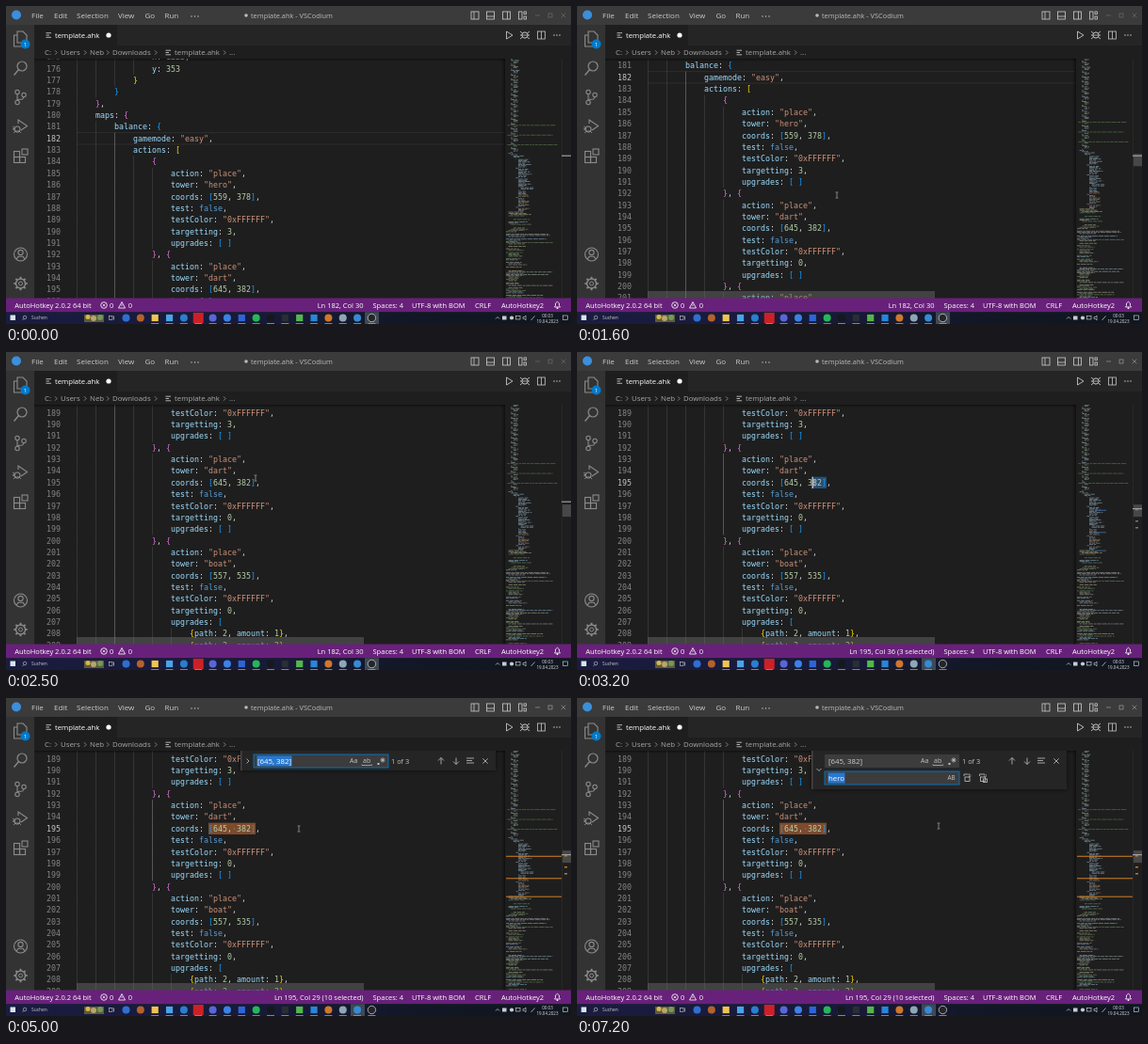
Recreate the animation shown at these times as an HTML page with a canvas. Size 600 px wide and 338 px high, loop 8 s.

```html
<!DOCTYPE html>
<html lang="en">
<head>
<meta charset="utf-8">
<title>Code editor</title>
<style>
  html, body { margin: 0; width: 100%; height: 100%; overflow: hidden; background: #1e1e1e; }
  canvas { display: block; width: 600px; height: 338px; }
</style>
</head>
<body>
<canvas id="stage"></canvas>
<script>
const LOOP = 8000, STEP = 100;
const UI = '"Open Sans", "Noto Sans", sans-serif';
const MONO = '"DejaVu Sans Mono", "Noto Sans Mono", monospace';
const CODE_SIZE = 8.3, LEFT = 75, CHAR = 5, LINE = 12.35, FIRST = 175;
const NOTCH = 32.5, NOTCHES = [1200, 1400, 1900, 2100, 2300];
const CLICK = 3000, DRAG_END = 3600, FIND = 4700, REPLACE = 5900;
const BRACKETS = ['#ffd700', '#da70d6', '#179fff'];
const POINTER = [[0, 388, 331], [700, 317, 236], [1600, 276, 201], [2500, 265, 134], [2900, 266, 139],
  [CLICK, 265, 139], [DRAG_END, 215, 139], [4000, 215, 139], [4600, 311, 139], [5300, 311, 139], [7200, 384, 136]];

const unit = (tower, coords, target) => [
  [5, 'action: "place",'], [5, `tower: "${tower}",`], [5, `coords: [${coords}],`], [5, 'test: false,'],
  [5, 'testColor: "0xFFFFFF",'], [5, `targetting: ${target},`]];
const DOC = [
  [4, 'x: 1222,'], [4, 'y: 353'], [3, '}'], [2, '}'], [1, '},'],
  [1, 'maps: {'], [2, 'balance: {'], [3, 'gamemode: "easy",'], [3, 'actions: ['], [4, '{'],
  ...unit('hero', '559, 378', 3), [5, 'upgrades: [ ]'], [4, '}, {'],
  ...unit('dart', '645, 382', 0), [5, 'upgrades: [ ]'], [4, '}, {'],
  ...unit('boat', '557, 535', 0), [5, 'upgrades: ['],
  [6, '{path: 2, amount: 1},'], [6, '{path: 2, amount: 2},'], [5, ']']];

const canvas = document.getElementById('stage');
const g = canvas.getContext('2d');
const ratio = window.devicePixelRatio || 1;
canvas.width = 600 * ratio;
canvas.height = 338 * ratio;

function tokenize() {
  let depth = 4;
  return DOC.map(([indent, source]) => {
    const tokens = [];
    for (const m of source.matchAll(/"[^"]*"|\d+|\w+|[^\s]/g)) {
      const s = m[0];
      let color = '#d4d4d4';
      if (s[0] === '"') color = '#ce9178';
      else if (/^\d/.test(s)) color = '#b5cea8';
      else if (s === 'false') color = '#569cd6';
      else if (/^\w/.test(s)) color = '#9cdcfe';
      else if (/[[{]/.test(s)) color = BRACKETS[depth++ % 3];
      else if (/[\]}]/.test(s)) color = BRACKETS[--depth % 3];
      tokens.push({ s, color, col: indent * 4 + m.index });
    }
    return { indent, tokens, length: source.length };
  });
}
const lines = tokenize();

function rect(x, y, w, h, color) { g.fillStyle = color; g.fillRect(x, y, w, h); }
function frame(x, y, w, h, color, width = 0.8) { g.strokeStyle = color; g.lineWidth = width; g.strokeRect(x, y, w, h); }
function disc(x, y, r, color) { g.fillStyle = color; g.beginPath(); g.arc(x, y, r, 0, 7); g.fill(); }
function ring(x, y, r, color, width = 0.8) {
  g.strokeStyle = color; g.lineWidth = width; g.beginPath(); g.arc(x, y, r, 0, 7); g.stroke();
}
function path(points, color, width = 0.8, closed = false) {
  g.strokeStyle = color; g.lineWidth = width; g.beginPath();
  for (let i = 0; i < points.length; i += 2) g.lineTo(points[i], points[i + 1]);
  if (closed) g.closePath();
  g.stroke();
}
function cross(x, y, r, color, width = 0.8) {
  path([x - r, y - r, x + r, y + r], color, width);
  path([x - r, y + r, x + r, y - r], color, width);
}
function text(s, x, y, size, color = '#cccccc', family = UI) {
  g.font = `${size}px ${family}`;
  g.fillStyle = color;
  g.fillText(s, x, y + size * 0.357);
}
function fade(x0, y0, x1, y1, ...colors) {
  const gradient = g.createLinearGradient(x0, y0, x1, y1);
  colors.forEach((c, i) => gradient.addColorStop(i / (colors.length - 1), c));
  return gradient;
}
function noise(n) { const v = Math.sin(n * 127.1 + 11.7) * 43758.5453; return v - Math.floor(v); }

function drawTitleBar(focused) {
  rect(0, 0, 600, 20, '#3b3b3c');
  disc(11, 9.5, 5, '#3b8fdc');
  [['File', 27], ['Edit', 51], ['Selection', 75], ['View', 119], ['Go', 147.5], ['Run', 168.5]]
    .forEach(([s, x]) => text(s, x, 10, 8));
  [197, 200.5, 204].forEach(x => disc(x, 11, 0.7, '#cccccc'));
  disc(255, 10, 1.8, '#bbbbbb');
  text('template.ahk - VSCodium', 260, 10, 7.4, '#bbbbbb');
  [498, 514.5, 531.5].forEach((x, i) => {
    frame(x - 4, 6, 8, 8, '#cccccc');
    if (i === 0) path([x - 1, 6, x - 1, 14], '#cccccc');
    if (i === 1) path([x - 4, 11, x + 4, 11], '#cccccc');
    if (i === 2) path([x + 1, 6, x + 1, 14], '#cccccc');
  });
  frame(544.5, 6, 3.5, 8, '#cccccc');
  frame(550, 6, 2.5, 2.5, '#cccccc');
  frame(550, 11, 2.5, 3, '#cccccc');
  const c = focused ? '#aaaaaa' : '#747474';
  path([562, 10, 567, 10], c, 0.6);
  frame(576, 8, 4, 4, c, 0.6);
  cross(592, 10, 2.3, c, 0.6);
}
function fileMark(x, y) {
  [-2.3, 0, 2.3].forEach((d, i) => path([x - 2.5, y + d, x + (i === 1 ? 1 : 3), y + d], '#c5c5c5', 0.9));
}

function drawActivityBar() {
  const c = '#8b8b8b';
  rect(0, 20, 30, 291, '#333333');
  path([12, 27, 18, 27, 22, 31, 22, 39, 12, 39], c, 1.1, true);
  path([12, 31, 8.5, 31, 8.5, 43, 18, 43, 18, 39], c, 1.1);
  disc(20.5, 40.5, 5, '#007acc');
  text('1', 18.8, 40.5, 6, '#ffffff');
  ring(17, 64, 5, c, 1.2);
  path([13.5, 67.5, 8.5, 73.5], c, 1.3);
  ring(12, 91.5, 2.2, c, 1.1); ring(12, 102.5, 2.2, c, 1.1); ring(19, 94.5, 2.2, c, 1.1);
  path([12, 94, 12, 100], c, 1.1);
  path([19, 97, 17.5, 99, 12, 99.5], c, 1.1);
  path([13, 125, 13, 121, 22.5, 127.5, 16, 132], c, 1.1);
  ring(12, 131, 3, c, 1.1);
  path([7, 128, 10, 130, 7, 131, 9, 131], c, 0.9);
  path([8, 135, 10, 133, 14, 133, 16, 135], c, 0.9);
  frame(8.5, 154.5, 6, 6, c, 1.1); frame(8.5, 160.5, 6, 6, c, 1.1);
  frame(14.5, 160.5, 6, 6, c, 1.1); frame(17, 152, 6, 6, c, 1.1);
  ring(15.5, 264, 7, c, 1.1); ring(15.5, 262, 2.6, c, 1.1);
  path([11, 269, 13, 266.3, 18, 266.3, 20, 269], c, 1.1);
  ring(15.5, 295, 5, c, 1.4); ring(15.5, 295, 2, c, 1);
  for (let i = 0; i < 8; i++) {
    const a = i * Math.PI / 4, dx = Math.cos(a), dy = Math.sin(a);
    path([15.5 + dx * 5, 295 + dy * 5, 15.5 + dx * 7.2, 295 + dy * 7.2], c, 1.8);
  }
}

function drawTabs() {
  rect(30, 20, 570, 22, '#252526');
  rect(30, 20, 88, 22, '#1e1e1e');
  fileMark(45, 31);
  text('template.ahk', 52, 31, 7.7, '#ffffff');
  disc(109, 31, 2.6, '#ffffff');
  const c = '#c5c5c5';
  path([531.5, 27, 538, 31, 531.5, 35], c, 0.9, true);
  ring(551, 31, 3.1, c, 1);
  path([549, 31, 553, 31], c, 0.8);
  [-1, 1].forEach(s => [-4, 0, 4].forEach(d => path([551 + s * 2.6, 31 + d * 0.5, 551 + s * 5, 31 + d], c, 0.9)));
  frame(564.5, 27, 8, 8, c); path([568.5, 27, 568.5, 35], c);
  [582, 585, 588].forEach(x => disc(x, 31, 0.75, c));
}
function drawBreadcrumb() {
  rect(30, 42, 570, 14, '#1e1e1e');
  const c = '#a9a9a9';
  [['C:', 41], ['Users', 58], ['Neb', 89], ['Downloads', 113], ['template.ahk', 179], ['...', 237]]
    .forEach(([s, x]) => text(s, x, 49.5, 7.8, c));
  [53, 84, 108, 159, 232].forEach(x => path([x - 1, 47.3, x + 1.2, 49.5, x - 1, 51.7], c, 0.7));
  fileMark(172, 49.5);
}

function drawCode(t, scroll) {
  const clicked = t >= CLICK, current = clicked ? 195 : 182;
  const dragged = Math.round(10 * Math.min(1, Math.max(0, (t - CLICK) / (DRAG_END - CLICK))));
  const center = n => 140.8 + (n - 182) * LINE - scroll;
  const caretX = 265 - dragged * CHAR;
  g.save();
  g.beginPath(); g.rect(30, 56, 500, 255); g.clip();
  if (!dragged) {
    const top = center(current) - LINE / 2;
    path([LEFT, top, 529, top], '#303030', 0.9);
    path([LEFT, top + LINE, 529, top + LINE], '#303030', 0.9);
  }
  lines.forEach(({ indent, tokens }, i) => {
    const n = FIRST + i, y = center(n);
    if (y < 48 || y > 318) return;
    for (let k = 0; k < indent; k++) {
      const active = clicked ? k === 4 && n > 192 && n < 200 : k === 2 && n > 181;
      rect(LEFT + k * 20, y - LINE / 2, 0.7, LINE, active ? '#707070' : '#404040');
    }
    if (n === 195 && dragged) {
      rect(caretX, y - LINE / 2, dragged * CHAR, LINE, t >= FIND ? '#7d4b2c' : '#264f78');
      if (dragged > 4) disc(242.5, y, 0.6, '#8a9299');
    }
    text(n, 43, y, CODE_SIZE, n === current ? '#c6c6c6' : '#858585', MONO);
    tokens.forEach(k => text(k.s, LEFT + k.col * CHAR, y, CODE_SIZE, k.color, MONO));
    const blink = t < 4000 || Math.floor((t - 4000) / 500) % 2 === 1;
    if (n === 195 && clicked && t < FIND && blink) rect(caretX - 0.5, y - LINE / 2, 1.3, LINE, '#d4d4d4');
  });
  if (t >= 300) rect(LEFT, 303, 305, 8, 'rgba(121,121,121,0.4)');
  rect(30, 56, 500, 3, fade(0, 56, 0, 59, 'rgba(0,0,0,0.45)', 'rgba(0,0,0,0)'));
  rect(526, 56, 4, 255, fade(526, 0, 530, 0, 'rgba(0,0,0,0)', 'rgba(0,0,0,0.5)'));
  g.restore();
  return dragged;
}

// Minimap rows: coordinate groups, then the map actions, then plain functions.
function minimapRow(n) {
  const r = noise(n);
  if (n < 180) {
    if (n % 8 === 5 && n > 150) return [2, 50 + r * 35, '#5a7d48'];
    const phase = n % 4;
    return [[8, 12, 12, 8][phase], [6 + r * 8, 8, 7, 2][phase], phase === 0 ? '#8ba9b9' : '#8f9d88'];
  }
  if (n < 228) {
    const row = lines[n - FIRST];
    if (row) return [row.indent * 4, row.length, '#8aa3b3'];
    return n % 8 === 0 ? [16, 4, '#a070a0'] : [20, 8 + r * 12, r > 0.6 ? '#a5896f' : '#7f9db3'];
  }
  if (r < (n < 236 ? 0.6 : 0.2)) return null;
  const wide = noise(n + 500) > 0.82 && n > 244;
  const indent = 4 * Math.floor(noise(n + 90) * (n < 244 ? 4 : 2));
  const colors = ['#6c8560', '#7aa0bd', '#a5a585', '#969696'];
  return [indent, wide ? 55 + r * 22 : 8 + r * 26, colors[Math.floor(noise(n + 300) * 4)]];
}
function drawMinimap(t, scroll, selected) {
  const shift = scroll * 0.05, rowY = n => 155 + (n - 179) * 1.3 - shift;
  const mark = t >= FIND ? 'rgba(205,125,35,0.8)' : 'rgba(55,105,155,0.75)';
  rect(530, 56, 70, 255, '#1e1e1e');
  g.save();
  g.beginPath(); g.rect(530, 56, 60, 255); g.clip();
  g.globalAlpha = 0.75;
  for (let n = 103; n < 306; n++) {
    const row = minimapRow(n);
    if (!row) continue;
    const x = 531 + row[0] * 0.65, w = row[1] * 0.65;
    for (let dx = 0, k = 0; dx < w; k++) {
      const piece = Math.min(w - dx, 2 + noise(n * 9 + k) * 4);
      rect(x + dx, rowY(n), piece, 0.8, row[2]);
      dx += piece + 0.8;
    }
  }
  g.globalAlpha = 1;
  if (selected) [195, 213, 228].forEach(n => rect(t >= FIND ? 531 : 550, rowY(n), t >= FIND ? 59 : 12, 1.3, mark));
  g.restore();
  rect(590, 56, 0.6, 255, '#303030');
  if (t >= 300) rect(591, 154 + shift, 9, 13, 'rgba(121,121,121,0.45)');
  rect(590, t >= CLICK ? 166 : 158.6, 10, 1.2, '#a0a0a0');
  if (selected) [167, 179, 186].forEach(y => rect(593, y, 3, 1.5, t >= FIND ? '#b87830' : '#777777'));
}

function drawInput(y, value, focused) {
  rect(263, y, 143, 14, '#3c3c3c');
  if (focused) {
    frame(263, y, 143, 14, '#007fd4');
    g.font = `7.85px ${UI}`;
    rect(266.5, y + 1.5, g.measureText(value).width + 1, 11, '#2878d0');
  }
  text(value, 267, y + 7, 7.85, focused ? '#ffffff' : '#cccccc');
}
function drawFind(t) {
  if (t < FIND) return;
  const replace = t >= REPLACE, h = replace ? 41 : 21, c = '#c5c5c5';
  const slide = Math.min(1, (t - FIND + STEP) / 200);
  g.save();
  g.beginPath(); g.rect(240, 56, 290, 60); g.clip();
  g.translate(0, (slide - 1) * 21);
  g.shadowColor = 'rgba(0,0,0,0.6)'; g.shadowBlur = 5;
  rect(249, 56, 271, h, '#252526');
  g.shadowBlur = 0; g.shadowColor = 'transparent';
  rect(249, 56, 1.5, h, '#454545');
  path(replace ? [254.5, 75, 257, 77.5, 259.5, 75] : [255.5, 64.5, 258, 67, 255.5, 69.5], c);
  drawInput(60, '[645, 382]', !replace);
  text('Aa', 365, 67, 7, c);
  text('ab', 379, 66.5, 7, c);
  path([378, 70.5, 378, 71.5, 388.5, 71.5, 388.5, 70.5], c, 0.7);
  rect(394.5, 69, 2, 2, c);
  cross(400, 66, 1.8, c); path([400, 63.3, 400, 68.7], c); path([397.4, 66, 402.6, 66], c);
  text('1 of 3', 409, 67.5, 7.4, c);
  [[462, -1], [478, 1]].forEach(([x, d]) => {
    path([x, 67 - 3.5 * d, x, 67 + 3.5 * d], c);
    path([x - 3, 67 + 0.5 * d, x, 67 + 3.5 * d, x + 3, 67 + 0.5 * d], c);
  });
  [[64, 4], [66.5, 3], [69, 4]].forEach(([y, w]) => path([489, y, 489 + w * 2, y], c));
  cross(509, 67, 2.7, c);
  if (replace) {
    drawInput(78, 'hero', true);
    text('AB', 393.5, 84.5, 6.4, c);
    [414.5, 431].forEach((x, i) => {
      frame(x - 2.5, 84, 5, 4.5, c);
      path([x - 3.5, 83, x - 3.5, 81, x + 1, 81], c);
      text('b', x + 1, 82, 5, c);
      if (i) frame(x + 0.5, 86, 4, 3.5, c);
    });
  }
  g.restore();
}

function drawStatus(selected, clicked) {
  rect(0, 310.5, 600, 15, '#68217a');
  const label = (s, x) => text(s, x, 318, 7.5, '#ffffff');
  label('AutoHotkey 2.0.2 64 bit', 9.3);
  ring(104, 318, 3.3, '#ffffff'); cross(104, 318, 1.3, '#ffffff', 0.7);
  label('0', 110);
  path([123, 314.5, 126.5, 321, 119.5, 321], '#ffffff', 0.8, true);
  path([123, 316.8, 123, 319], '#ffffff', 0.7);
  label('0', 129.8);
  let place = clicked ? `Ln 195, Col ${39 - selected}` : 'Ln 182, Col 30';
  if (selected) place += ` (${selected} selected)`;
  g.textAlign = 'right'; label(place, 379.5); g.textAlign = 'left';
  [['Spaces: 4', 389.5], ['UTF-8 with BOM', 431], ['CRLF', 498], ['AutoHotkey2', 526]].forEach(a => label(...a));
  path([582.5, 320, 583.5, 318.5, 583.5, 316, 585.5, 314.3, 587.5, 316, 587.5, 318.5, 588.5, 320], '#ffffff', 0.8, true);
  disc(585.5, 321.2, 0.9, '#ffffff');
}

function drawTaskbar(clicked) {
  rect(0, 325.3, 600, 13, fade(0, 0, 600, 0, '#1a1c40', '#191b3c', '#171a36', '#111724', '#101720'));
  rect(4.5, 328.5, 5.5, 5.5, '#d8e4ee');
  ring(20, 331, 1.8, '#cccccc', 0.6);
  path([18.7, 332.5, 17.4, 334], '#cccccc', 0.6);
  text('Suchen', 27, 331.5, 4.9, '#cccccc');
  rect(83, 328, 21, 8, '#5e5b38');
  disc(87, 330.5, 2.5, '#d6b84c'); disc(93, 332, 3, '#b9a66c'); disc(100, 331, 3, '#749a58');
  frame(109.5, 329.5, 3.5, 4, '#cccccc', 0.6); rect(114, 329.5, 1, 4, '#999999');
  rect(clicked ? 366 : 381, 325.3, 15, 13, '#3e4955');
  const icons = ['#2f6fd0', '#b5622c', '#f0c451', '#4aa3e8', '#2a7ed0', '#cc2027', '#5a66d8', '#3b82e5',
    '#2d65d8', '#25b857', '#16181c', '#2a2d33', '#54b64d', '#2786db', '#d0772c', '#8fa6b5', '#358bd5', '#252528'];
  icons.forEach((color, i) => {
    const x = 127.5 + i * 15.35;
    if ([2, 3, 5, 8, 11, 12, 13].includes(i)) {
      const r = i === 5 ? 5.5 : 3.6;
      rect(x - r, 331.5 - r, r * 2, r * 2, color);
    } else disc(x, 331.5, 4, color);
    if (i > 1) rect(x - 4, 337.2, 8, 0.8, '#76a9dd');
  });
  ring(388.4, 331.5, 4.2, '#c5c8cb', 0.8);
  path([520, 332.5, 522, 330.5, 524, 332.5], '#dddddd', 0.7);
  rect(527, 329.5, 4.5, 4, '#c7cdd2'); disc(537, 331.5, 2.1, '#c7cdd2');
  frame(541.5, 329.5, 4.5, 3.5, '#dddddd', 0.6);
  path([549, 330.5, 550.5, 330.5, 552, 329, 552, 334, 550.5, 332.5, 549, 332.5], '#dddddd', 0.6, true);
  path([557.5, 334, 561.5, 329.5], '#dddddd', 0.7);
  g.textAlign = 'center';
  text('00:03', 575, 328.9, 4.5, '#e0e0e0');
  text('19.04.2023', 575, 334.9, 4.5, '#e0e0e0');
  g.textAlign = 'left';
  frame(591.5, 329, 5, 4.5, '#dddddd', 0.6);
}

function drawPointer(t) {
  let i = POINTER.findIndex(p => p[0] > t);
  if (i < 0) i = POINTER.length;
  const a = POINTER[i - 1], b = POINTER[i] || a;
  const u = a === b ? 0 : (t - a[0]) / (b[0] - a[0]);
  const e = u * u * (3 - 2 * u);
  const x = a[1] + (b[1] - a[1]) * e, y = a[2] + (b[2] - a[2]) * e;
  if (y > 307) return;
  const c = '#b0b0b0';
  path([x, y - 2.6, x, y + 2.6], c, 0.7);
  [-3, 3].forEach(d => path([x - 1.4, y + d, x + 1.4, y + d], c, 0.7));
}

function draw(now) {
  const t = Math.floor((now % LOOP) / STEP) * STEP;
  const scroll = NOTCH * NOTCHES.filter(at => t >= at).length;
  const clicked = t >= CLICK;
  g.setTransform(ratio, 0, 0, ratio, 0, 0);
  rect(0, 0, 600, 338, '#1e1e1e');
  const selected = drawCode(t, scroll);
  drawMinimap(t, scroll, selected);
  drawTabs();
  drawBreadcrumb();
  drawFind(t);
  drawTitleBar(clicked);
  drawActivityBar();
  drawStatus(selected, clicked);
  drawTaskbar(clicked);
  drawPointer(t);
}
const start = performance.now();
function tick() {
  draw(performance.now() - start);
  requestAnimationFrame(tick);
}
tick();
</script>
</body>
</html>
```
